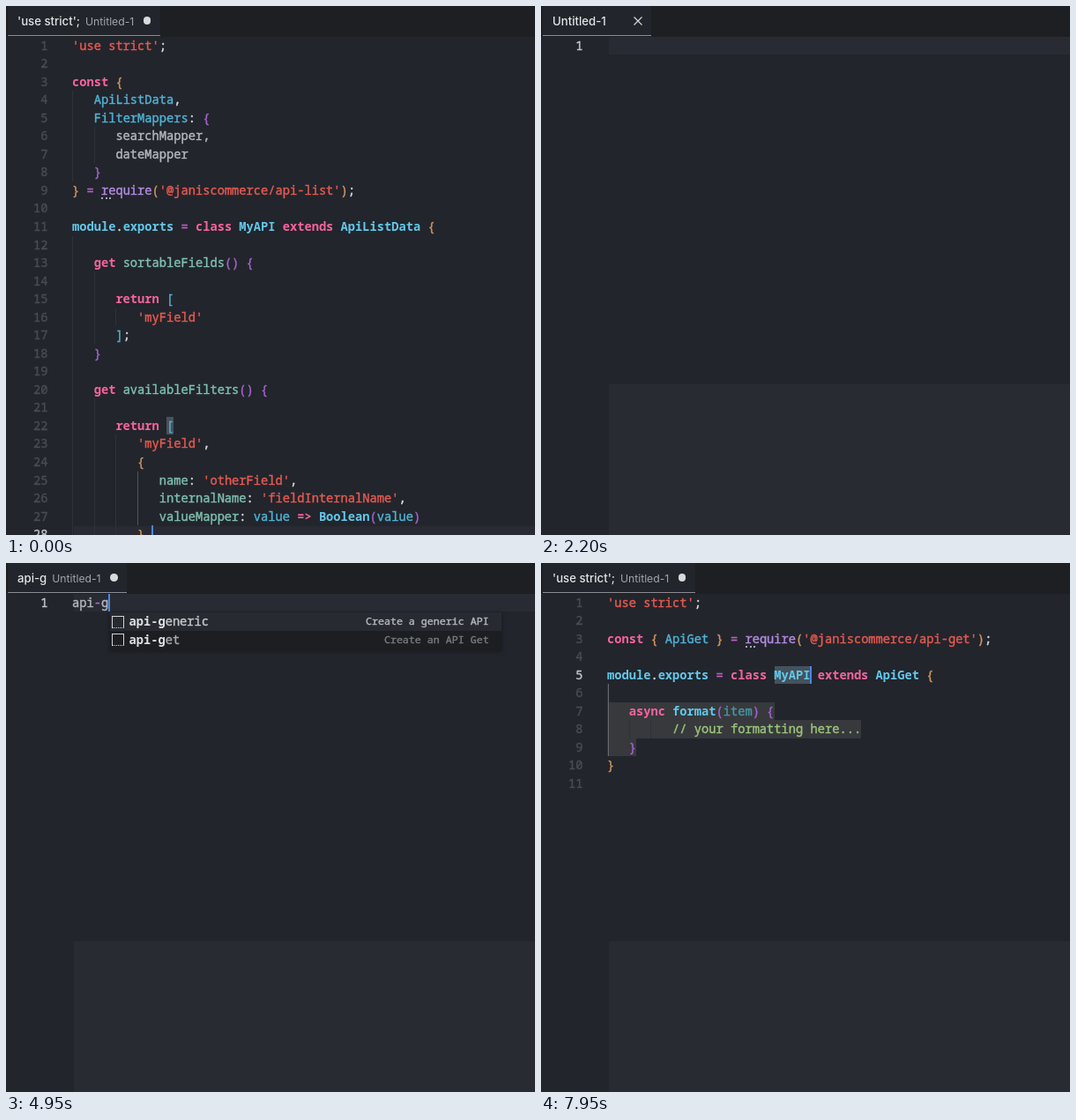
Write an HTML page that moves like this. It is 600 by 600 pixels and loops after 8 s.

```html
<!DOCTYPE html>
<html lang="en">
<head>
<meta charset="utf-8">
<title>Snippet completion</title>
<style>
  :root { --row: 20.54px; --x: 75px; }
  html, body { margin: 0; width: 100%; height: 100%; overflow: hidden; background: #22252c; }
  #stage { position: relative; width: 600px; height: 600px; overflow: hidden; background: #22252c;
    font: 13.73px/20.54px "Noto Sans Mono", "DejaVu Sans Mono", monospace; color: #b4b8bf; white-space: pre;
    -webkit-text-stroke: .4px; }
  #stage div, #stage i { position: absolute; }
  #stage b { font-weight: 400; }

  #strip { left: 0; top: 0; width: 600px; height: 35px; background: #1d1f22; }
  #tab { left: 2px; top: 0; height: 34px; box-sizing: border-box; min-width: 122.5px; padding: 0 29.5px 0 11px;
    background: #22252b; border-bottom: 1px solid #8b8e94; font: 500 13.2px/34px Inter, sans-serif; color: #e4e5e7;
    -webkit-text-stroke: 0; }
  #tab small { font-size: 12.2px; font-weight: 400; color: #a2a5aa; margin-left: 6px; }
  #dot { right: 10.5px; top: 12.3px; width: 8.6px; height: 8.6px; border-radius: 50%; background: #d9dadc; }
  #close { position: absolute; right: 9.5px; top: 11.5px; width: 10px; height: 10px; stroke: #d4d5d7; stroke-width: 1.2; }
  #panel { left: 77px; top: 429px; width: 523px; height: 171px; background: #282b32; }

  .scene { inset: 0; }
  .current { left: 77px; width: 523px; height: 20px; background: #282b33; }
  .line { left: var(--x); height: var(--row); }
  .num { left: 0; width: 47.5px; text-align: right; color: #484c55; }
  .num.on { color: #c3c6cc; }
  .guide { width: 1px; height: var(--row); background: #2e3239; }
  .guide.on { background: #50545b; }
  .mark { height: var(--row); background: #37393d; }
  #cursor { width: 2px; height: 20.5px; margin-left: -.7px; background: #4c86e6; }

  #stage .p { color: #f8639f; font-weight: 700; -webkit-text-stroke: 0; }
  .s { color: #e65a50; }
  .w { color: #dcdfe4; }
  .c { color: #4fb3d6; }
  #stage .C { color: #62c8ea; font-weight: 700; -webkit-text-stroke: 0; }
  .o { color: #d2955f; }
  .v { color: #a763cf; }
  .l { color: #b38be2; }
  .t { color: #7fc0b0; }
  .k { color: #4a94a8; }
  .n { color: #9cc77a; }
  .m { color: #c05fc6; }
  .lint { width: 11px; height: 0; border-bottom: 2px dotted #a5a8ad; }

  .popup { top: 56px; width: 444px; background: #1c1e21; box-shadow: 0 1px 4px #16181b; }
  .item { left: 0; width: 100%; height: 20.55px; color: #a6a9ae; }
  .item.on { background: #272a31; color: #c6c8cc; }
  .item span { position: absolute; left: 21.7px; }
  #stage .item b { font-weight: 700; color: #dfe0e2; -webkit-text-stroke: 0; }
  .item em { position: absolute; right: 14px; font-size: 11.67px; font-style: normal; color: #777a80; }
  .item.on em { color: #b6b8bc; }
  .item.old { color: #74777c; }
  #stage .item.old b { color: #85888d; }
  .item.old span { text-decoration: line-through; }
  .box { left: 2.5px; top: 3.5px; width: 12px; height: 12px; border: 1px solid #d0d2d5; border-bottom-style: dotted; }
  .item svg { position: absolute; left: 1px; top: 3px; width: 16px; height: 14px; fill: none; stroke: #5fb4ee; stroke-width: 1.2; }
  .bar { right: 5px; top: 1px; width: 10px; height: 159px; background: #2c2f35; }
</style>
</head>
<body>
<div id="stage">
  <div id="strip"></div>
  <div id="tab"><span id="title"></span><small id="desc">Untitled-1</small><div id="dot"></div><svg id="close" viewBox="0 0 10 10"><path d="M.5 .5l9 9M9.5 .5l-9 9"/></svg></div>
  <div id="panel"></div>
  <div id="cursor"></div>
</div>
<script>
const LOOP = 8000, CH = 8.24, ROW = 20.54, X = 75, Y = 34.6;
const $ = id => document.getElementById(id);
const stage = $('stage');

// In code lines "^x" opens a run of colour class x.
const listCode = `^s'use strict'^w;

^pconst ^o{
   ^cApiListData^w,
   ^cFilterMappers^w: ^v{
      ^asearchMapper,
      ^adateMapper
   ^v}
^o} ^m= ^lrequire^o(^s'@janiscommerce/api-list'^o)^w;

^Cmodule^w.^Cexports ^m= ^pclass ^CMyAPI ^pextends ^CApiListData ^o{

   ^pget ^tsortableFields^v() {

      ^preturn ^c[
         ^s'myField'
      ^c]^w;
   ^v}

   ^pget ^tavailableFilters^v() {

      ^preturn ^c[
         ^s'myField'^w,
         ^o{
            ^tname^w: ^s'otherField'^w,
            ^tinternalName^w: ^s'fieldInternalName'^w,
            ^tvalueMapper^w: ^cvalue ^p=> ^CBoolean^v(^cvalue^v)
         ^o}`;

const getCode = `^s'use strict'^w;

^pconst ^o{ ^cApiGet ^o} ^m= ^lrequire^o(^s'@janiscommerce/api-get'^o)^w;

^Cmodule^w.^Cexports ^m= ^pclass ^CMyAPI ^pextends ^CApiGet ^o{

   ^pasync ^Cformat^v(^kitem^v) {
         ^n// your formatting here...
   ^v}
^o}
`;

// Suggestions: label, detail, kind ("*" marks single matched letters).
const apiItems = [
  ['api-generic', 'Create a generic API'],
  ['api-get', 'Create an API Get'],
  ['api-list', 'Create an API List'],
  ['api-list-value-mapper', 'API List value mapper'],
  ['api-save', 'Create an API Save'],
  ['api-test', 'Create an API test'],
  ['api-test-item', 'Create an api test item']
];
const otherItems = [
  ['*Aud*io*Param', '', 'var'],
  ['*Aud*io*ParamMap', '', 'var'],
  ['*Aud*io*ProcessingEvent', '', 'var old'],
  ['*An*imation*PlaybackEvent', '', 'var'],
  ['*afterDescr*i*ption', '']
];

const typed = (at, text, items, extra) =>
  ({ at, title: text, code: text.replace('-', '^m-^a'), row: 0, col: text.length, items, ...extra });

const scenes = [
  { at: 0, title: "'use strict';", code: listCode, row: 27, col: 11, lint: [8, 4],
    marks: [[21, 13, 14, '#4a5159']] },
  typed(400, ''),
  typed(3400, 'a'),
  typed(3520, 'ap'),
  typed(3640, 'api', [...apiItems, ...otherItems]),
  typed(4300, 'api-', apiItems),
  typed(4600, 'api-g', apiItems.slice(0, 2)),
  typed(5900, 'api-ge', apiItems.slice(0, 2), { blink: 6050 }),
  typed(7000, 'api-ge', apiItems.slice(0, 2), { blink: 6050, pick: 1 }),
  { at: 7480, title: "'use strict';", code: getCode, row: 4, col: 28, lint: [2, 19], selected: true,
    marks: [[4, 23, 28, '#45525c'], [6, 0, 23], [7, 0, 35], [8, 0, 4],
            ...[5, 6, 7, 8].map(row => [row, 0, .22, '#66696e'])] }
];

function add(parent, cls, style = {}, text) {
  const el = document.createElement('div');
  el.className = cls;
  Object.assign(el.style, style);
  if (text) el.textContent = text;
  parent.append(el);
  return el;
}

function runs(el, text) {
  text.split('^').forEach((part, i) => {
    const b = document.createElement('b');
    if (i) b.className = part[0];
    b.textContent = i ? part.slice(1) : part;
    el.append(b);
  });
}

const px = n => n + 'px';
const place = (row, col) => ({ left: px(X + col * CH), top: px(Y + row * ROW) });
const indent = s => s.length - s.trimStart().length;

function addCode(box, scene) {
  const lines = scene.code.split('\n');
  for (const [row, from, to, color] of scene.marks || [])
    add(box, 'mark', { ...place(row, from), width: px((to - from) * CH), background: color || '' });
  lines.forEach((line, row) => {
    const top = px(Y + row * ROW);
    const next = lines.slice(row).find(s => s.trim()) || '';
    for (let col = 0; col < indent(next); col += 3)
      add(box, col === 9 ? 'guide on' : 'guide', place(row, col));
    add(box, row === scene.row ? 'num on' : 'num', { top }, String(row + 1));
    runs(add(box, 'line', { top }), line);
  });
  if (scene.lint) add(box, 'lint', { ...place(...scene.lint), marginTop: '18px' });
}

function addPopup(box, { items, title, col, pick = 0 }) {
  const pop = add(box, 'popup', { left: px(X + col * CH + 1.6), height: px(items.length * 20.55 + 2) });
  items.forEach(([label, detail, kind = ''], i) => {
    const row = add(pop, `item ${kind} ${i === pick ? 'on' : ''}`, { top: px(i * 20.55) });
    const html = label.includes('*')
      ? label.replace(/\*(.)/g, '<b>$1</b>')
      : `<b>${title}</b>${label.slice(title.length)}`;
    const icon = kind
      ? '<svg viewBox="0 0 16 14"><path d="M4 2H1.5v10H4M12 2h2.5v10H12M4.5 7l4-2.5 3 1v2.5l-4 2.5-3-1zl3 1 4-2.5M7.5 8v2.5"/></svg>'
      : '<i class="box"></i>';
    row.innerHTML = `${icon}<span>${html}</span><em>${detail}</em>`;
  });
  if (items.length > 7) add(pop, 'bar');
}

for (const scene of scenes) {
  const box = scene.el = add(stage, 'scene');
  if (!scene.selected) add(box, 'current', { top: px(Y + scene.row * ROW + .4) });
  addCode(box, scene);
  if (scene.items) addPopup(box, scene);
}
stage.append($('cursor'));

const sceneAt = t => scenes.findLast(s => s.at <= Math.max(0, t));
const show = (el, on) => { el.style.display = on ? '' : 'none'; };

function render(t) {
  const now = sceneAt(t);
  for (const s of scenes) show(s.el, s === now);
  show($('panel'), now !== scenes[0]);

  // The tab title follows the text a little late.
  const title = sceneAt(t - 100).title;
  const named = title.length > 1;
  $('title').textContent = named ? title : 'Untitled-1';
  show($('desc'), named);
  show($('dot'), now.title);
  show($('close'), !now.title);

  const age = Math.max(0, t - (now.blink ?? now.at));
  Object.assign($('cursor').style, place(now.row, now.col));
  show($('cursor'), age % 1000 < 500);
}

const start = performance.now();
function tick() {
  render((performance.now() - start) % LOOP);
  requestAnimationFrame(tick);
}
tick();
</script>
</body>
</html>
```
